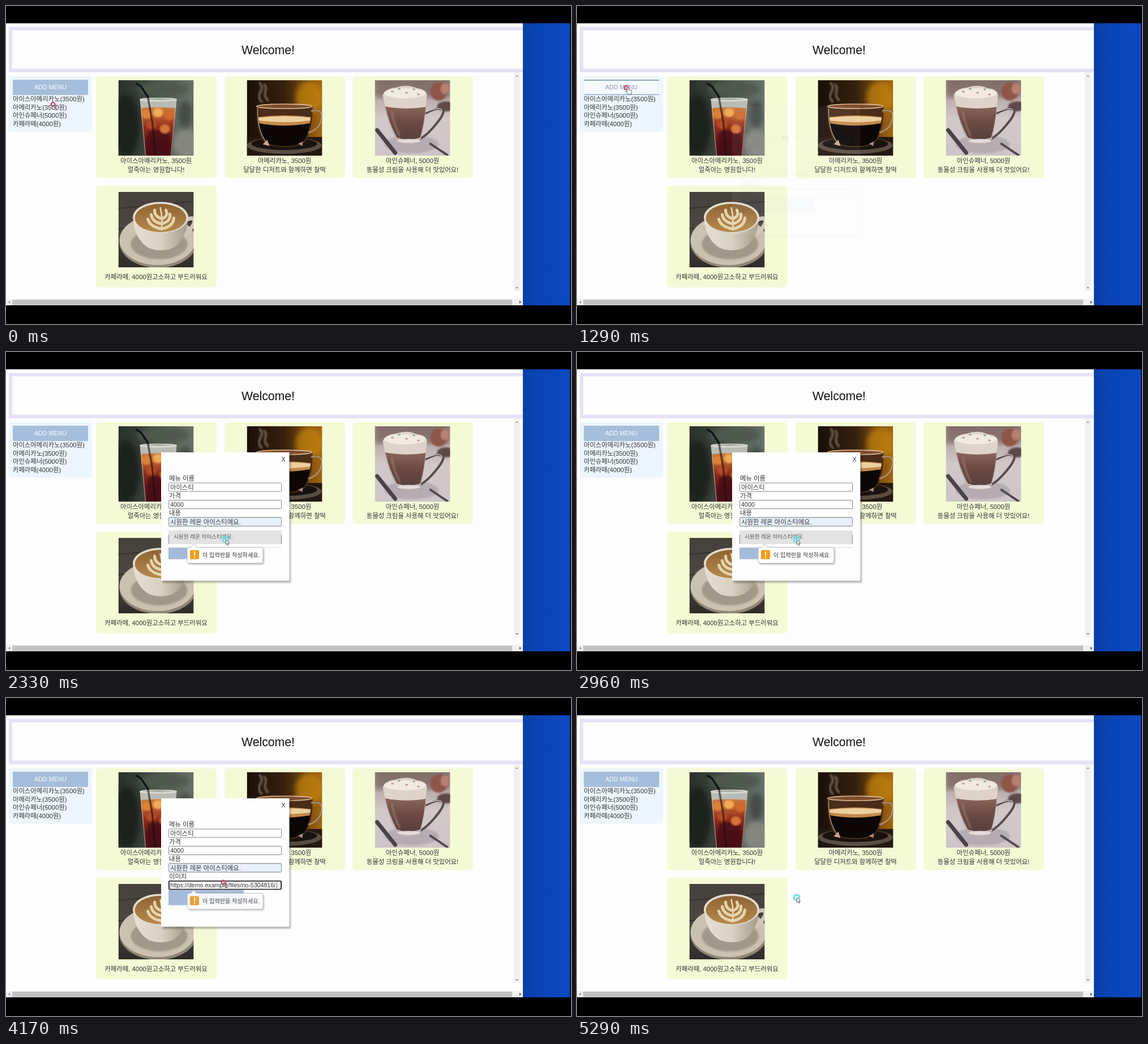
Recreate the animation shown at these times as an HTML page. Size 998x561 px, loop 5.33 s.

```html
<!DOCTYPE html>
<html lang="ko">
<head>
<meta charset="utf-8">
<title>Cafe menu</title>
<style>
  html, body { margin: 0; width: 100%; height: 100%; overflow: hidden; background: #000; }
  svg { display: block; width: 998px; height: 561px; }
  text { font-family: "Liberation Sans", "Noto Sans CJK KR", "Noto Sans CJK", sans-serif; fill: #333; white-space: pre; }
</style>
</head>
<body>
<svg id="stage" viewBox="0 0 998 561" xmlns="http://www.w3.org/2000/svg"></svg>
<script>
const LOOP = 5330;
const rect = (x, y, w, h, fill, more = '') =>
  `<rect x="${x}" y="${y}" width="${w}" height="${h}" fill="${fill}" ${more}/>`;
const oval = (x, y, rx, ry, fill, more = '') =>
  `<ellipse cx="${x}" cy="${y}" rx="${rx}" ry="${ry}" fill="${fill}" ${more}/>`;
const path = (d, fill, more = '') => `<path d="${d}" fill="${fill}" ${more}/>`;
const line = (d, color, width, more = '') =>
  path(d, 'none', `stroke="${color}" stroke-width="${width}" stroke-linecap="round" ${more}`);
const text = (x, y, s, size = 11.35, more = '') =>
  `<text x="${x}" y="${y}" font-size="${size}" ${more}>${s}</text>`;
const mid = (x, y, s, size, more = '') => text(x, y, s, size, 'text-anchor="middle" ' + more);
const group = (id, body) => `<g id="${id}" opacity="0">${body}</g>`;
const grad = (id, dir, ...stops) => `<linearGradient id="${id}" ${dir}>` +
  stops.map((c, i) => `<stop offset="${i / (stops.length - 1)}" stop-color="${c}"/>`).join('') +
  '</linearGradient>';
const down = 'x1="0" y1="0" x2="0" y2="1"', across = 'x1="0" y1="0" x2="1" y2="0"';
const blur = 'filter="url(#blur)"', soft = 'filter="url(#soft)"';

const defs = '<defs>' +
  grad('sky', across, '#0b3fa6', '#0a45b6', '#0a47bb', '#0a49c0') +
  grad('garden', across, '#2b302b', '#39413a', '#59625a', '#6a716a') +
  grad('tea', down, '#d0925e', '#c4692f', '#8f2d1c', '#5a1717', '#4a1215') +
  grad('amber', across, '#1a0f08', '#37200d', '#a5680f') +
  grad('table', down, '#a3918e', '#d2c8c9', '#cdc5c8') +
  grad('mocha', down, '#8a685c', '#6b4a42', '#58403b') +
  grad('wood', down, '#45413b', '#4c4740', '#2f2c28') +
  grad('cup', across, '#e6dfd2', '#d9d1c2', '#a49a8a') +
  grad('crema', down, '#8f6434', '#b58a4e') +
  '<clipPath id="square"><rect width="133" height="133"/></clipPath>' +
  '<filter id="blur"><feGaussianBlur stdDeviation="5"/></filter>' +
  '<filter id="soft"><feGaussianBlur stdDeviation="1.5"/></filter>' +
  '<filter id="lens" x="0" y="0" width="1" height="1"><feGaussianBlur stdDeviation=".7"/></filter></defs>';

const photos = [
  // iced coffee
  rect(0, 0, 133, 133, 'url(#garden)') +
  oval(14, 80, 24, 55, '#1d221e', blur) + oval(80, 16, 45, 14, '#4d5a4c', blur) +
  oval(120, 112, 24, 26, '#85877f', blur) + oval(118, 60, 12, 24, '#454c45', blur) +
  path('M38 33H103L94 133H47Z', 'url(#tea)') +
  path('M38 33H103L101 49Q70 46 40 49Z', '#b9bcb4') +
  path('M52 92Q72 82 91 94L90 133H51Z', '#4a1113', `opacity=".8" ${soft}`) +
  [[50, 60, '#dd8136'], [70, 57, '#f0ab58'], [90, 62, '#cf6a2c'], [58, 78, '#b44c25'], [82, 86, '#d5743a']]
    .map(([x, y, c]) => oval(x, y, 9, 8, c, soft)).join('') +
  line('M39 35L48 133M102 35L93 133', '#cfc9c0', 1.5, 'opacity=".6"') +
  oval(70.5, 34, 32, 2.5, 'none', 'stroke="#e4e6e1" stroke-width="1.5"') +
  line('M32 6L40 11L52 29', '#101418', 3.5) +
  line('M52 29L60 74L65 133', '#1a0f0f', 3.5, 'opacity=".6"'),
  // espresso
  rect(0, 0, 133, 133, 'url(#amber)') +
  oval(110, 30, 24, 28, '#c8860f', `opacity=".7" ${blur}`) +
  rect(0, 100, 133, 33, '#241812') +
  oval(66, 115, 66, 15, '#5a4d41') + oval(66, 112, 58, 11, '#1a120f') +
  path('M17 46H116Q117 84 104 106Q96 118 66 118Q36 118 28 106Q16 87 17 46Z', '#4a2c18') +
  path('M21 72H112Q109 98 99 109Q90 116 66 116Q42 116 34 109Q24 96 21 72Z', '#0c0706') +
  path('M20 65Q66 59 113 65L111 76Q66 84 22 76Z', '#c48a4c') +
  path('M21 66Q66 61 112 66L112 71Q66 77 21 71Z', '#ecd0a0') +
  oval(66, 46, 49, 4, '#7e4d2c', 'stroke="#d9b99a" stroke-width="1.6"') +
  line('M115 54Q135 50 132 67Q129 86 110 92', '#8c6640', 4.5) +
  line('M115 54Q135 50 132 67Q129 86 110 92', '#d3ae7e', 1.2) +
  line('M19 50Q18 88 34 109', '#b89a7c', 1.3) +
  line('M26 38C12 23 34 20 23 5M37 35C25 23 39 17 31 8', '#b5a396', 4, `opacity=".5" ${soft}`) +
  path('M28 113L36 105L40 116Z', '#c9a892') + path('M90 112L99 108L98 116Z', '#a88b7a'),
  // einspanner
  rect(0, 0, 133, 133, 'url(#table)') +
  rect(0, -8, 133, 38, '#75605b', `opacity=".7" ${blur}`) +
  oval(113, 20, 15, 16, '#8e5448', soft) + oval(124, 15, 8, 10, '#b8806f', soft) +
  oval(126, 46, 16, 9, '#5d4a46', soft) +
  oval(65, 113, 48, 16, '#b5abb0', soft) +
  line('M4 88L36 128', '#4a4249', 7) + line('M98 112L128 132', '#534b50', 4) +
  line('M90 58C126 40 130 52 106 80Q92 97 79 104', '#584a4b', 4) +
  line('M90 56C124 41 126 54 103 78', '#cdc1c3', 1.3) +
  path('M14 26H92Q89 75 81 105Q78 113 59 113Q40 113 37 105Q19 68 14 26Z', '#bfafad') +
  path('M18 44H90Q87 78 80 101Q59 108 39 101Q25 76 18 44Z', 'url(#mocha)') +
  line('M30 56Q34 80 44 98', '#a58a81', 3, `opacity=".6" ${soft}`) +
  oval(60, 107, 20, 3.5, '#e4dcdc') +
  path('M14 26Q20 14 37 13Q57 6 74 14Q92 16 92 27L90 47Q54 53 18 46Z', '#dfd3c9') +
  oval(53, 23, 37, 9, '#f1e9e2') +
  [[31, 20], [43, 15], [56, 22], [69, 16], [77, 25]]
    .map(([x, y], i) => oval(x, y, 2.4, 1.6, i % 2 ? '#8fa892' : '#bd9294')).join(''),
  // latte
  rect(0, 0, 133, 133, 'url(#wood)') +
  line('M0 29L133 17M0 65L133 53', '#302d29', 1.5) +
  oval(70, 89, 68, 45, '#8f8677') + oval(69, 85, 67, 44, '#cac1b1') + oval(72, 92, 50, 27, '#a2988a', soft) +
  line('M119 50C140 38 140 60 115 75', '#cfc6b7', 7) +
  path('M26 45Q28 84 54 99Q75 107 96 99Q121 84 123 45Z', 'url(#cup)') +
  oval(74.5, 45, 49, 27.5, '#e3dccd') + oval(74.5, 46, 45.5, 25, 'url(#crema)') +
  line('M76 67Q79 48 74 28', '#ecdcba', 2.5) +
  [0, 1, 2].map(i => line(`M76 ${65 - i * 9}Q${56 + i * 4} ${62 - i * 9} ${52 + i * 6} ${48 - i * 8}` +
    `M77 ${65 - i * 9}Q${97 - i * 4} ${61 - i * 9} ${98 - i * 7} ${46 - i * 7}`, '#e6d3ab', 5)).join('')
];

const cards = [
  [159, 124, ['아이스아메리카노, 3500원', '얼죽아는 영원합니다!']],
  [386, 124, ['아메리카노, 3500원', '달달한 디저트와 함께하면 찰떡']],
  [612, 124, ['아인슈페너, 5000원', '동물성 크림을 사용해 더 맛있어요!']],
  [159, 317, ['카페라떼, 4000원고소하고 부드러워요']]
].map(([x, y, rows], i) => {
  const top = y === 124 ? 131 : 328;
  return rect(x, y, 213, 179.5, '#f4fad5', 'rx="6"') +
    `<g transform="translate(${x + 39.5} ${top})" clip-path="url(#square)"><g filter="url(#lens)">${photos[i]}</g></g>` +
    rows.map((s, n) => mid(x + 106, (rows.length > 1 ? 277 : 482) + n * 16, s, 11.4)).join('');
}).join('');

const sidebar = rect(5, 124, 147, 97.5, '#edf5fe', 'rx="4"') +
  rect(12, 130, 133, 27, '#a5bedb', 'rx="1"') +
  mid(78.5, 147, 'ADD MENU', 10.7, 'style="fill:#f8fbff"') +
  group('hover', rect(12, 130, 133, 27, '#f5f9ff') + rect(12, 130, 133, 1.6, '#7590b2') +
    rect(12, 155.6, 133, 1.4, '#8ea5cf') + mid(78.5, 147, 'ADD MENU', 10.7, 'style="fill:#9196b0"')) +
  ['아이스아메리카노(3500원)', '아메리카노(3500원)', '아인슈페너(5000원)', '카페라떼(4000원)']
    .map((s, i) => text(12, 168 + i * 14.6, s)).join('');

const bars = rect(897, 117, 11, 386, '#f1f1f1') + rect(0, 517, 913, 11, '#f0f0f2') +
  rect(11, 518, 883, 9.5, '#c1c1c3') +
  path('M900 125h5l-2.5-3z', '#9a9a9a') + path('M900 496h5l-2.5 3z', '#8a8a8a') +
  path('M7 520v5l-3-2.5z', '#8a8a8a') + path('M907 520v5l3-2.5z', '#444');

const page = rect(0, 30.5, 913, 497.5, '#fdfdfd') +
  path('M5 37H913V117H5ZM11 43V110.5H913V43Z', '#e6e2f6', 'fill-rule="evenodd"') +
  mid(463, 84.5, 'Welcome!', 21.2, 'style="fill:#111"') +
  sidebar + cards + bars + rect(913, 30.5, 83.5, 497.5, 'url(#sky)');

const fieldY = [231, 261.5, 292, 322.5];
const fields = fieldY.map((y, i) =>
  text(288, y - 4, ['메뉴 이름', '가격', '내용', '이미지'][i]) +
  rect(287.5, y, 199, 15, '#fff', 'stroke="#858585" rx="1.5"')).join('');
const hints = ['ex) 아메리카노', 'ex) 4000', 'ex) 고소한 원두를 사용했어요.', 'URL']
  .map((s, i) => text(290, fieldY[i] + 11.5, s, 11.3, 'style="fill:#999"')).join('');

const ring = (color, r, w, more = '') => `<circle r="${r}" fill="none" stroke="${color}" stroke-width="${w}" ${more}/>`;
const red = ring('#d94766', 3.4, 2.4);
const beam = red + line('M3 1.5H7M5 1.5V9.5M3 9.5H7', '#666', 1);
const hand = red + path('M2 0Q3.5-1.5 4.5 0V4L9 5Q10 6 9 9L8 12H3L-1 7Q0 5 2 7Z', '#fff', 'stroke="#555" stroke-width=".9"');
const arrow = ring('#8ce9f3', 5.5, 4, `opacity=".5" ${soft}`) + ring('#6adcec', 4.8, 2.6) +
  path('M.5 0V9L2.6 7L4.2 10.3L5.4 9.7L4 6.4H6.8Z', '#fff', 'stroke="#555" stroke-width=".9"');

const modal = rect(276, 179, 227, 228, '#000', `opacity=".28" ${soft}`) +
  rect(274, 177, 226.5, 226.5, '#fefefe') + text(486.5, 193, 'X', 10.8) + fields +
  rect(287, 338.5, 133, 27, '#a5bbd9') + mid(353.5, 356, '메뉴 추가', 11, 'style="fill:#f8fbff"') +
  group('submit', rect(287, 338.5, 133, 27, '#f5f9ff') + rect(287, 338.5, 133, 1.6, '#7590b2') +
    rect(287, 364, 133, 1.4, '#8ea5cf') + mid(353.5, 356, '메뉴 추가', 11, 'style="fill:#9196b0"')) +
  group('hints', hints) +
  group('filled', text(290, 242.5, '아이스티') + text(290, 272.5, '4000', 10.8)) +
  group('autofill', rect(287.5, 292, 199, 15, '#e8f0fe', 'stroke="#8a8f9b" rx="1.5"')) +
  group('note', text(290, 304, '', 11.4, 'id="typed"')) +
  group('list', rect(287, 308, 200, 37, '#fefefe') + rect(287, 314.5, 200, 24.5, '#e3e3e3') +
    line('M287.5 323V338M486.5 323V338', '#858585', 1) + line('M288 345H486', '#ddd', 1) +
    text(296, 329, '시원한 레몬 아이스티에요.', 9.6, 'style="fill:#555"')) +
  group('url', rect(288, 323, 198, 14.5, '#fff', 'stroke="#151515" stroke-width="1.7" rx="1.5"') +
    text(290, 334, 'https://demo.example/files/no-5304816/', 10.64) +
    line('M478.5 326V335', '#333', .8)) +
  group('bubble', rect(322, 346, 134, 29, '#000', `rx="4" opacity=".25" ${soft}`) +
    path('M323 344.5H326L331.5 339L337 344.5H451Q454 344.5 454 348V369Q454 372.5 451 372.5H323Q320 372.5 320 369V348Q320 344.5 323 344.5Z',
      '#fff', 'stroke="#b5b5b5"') +
    rect(325, 349.5, 16, 16, '#f29d16', 'rx="2"') + rect(332, 352, 2, 7, '#fff') + rect(332, 361, 2, 2, '#fff') +
    text(347, 361.5, '이 입력란을 작성하세요.', 10.1));

const $ = id => document.getElementById(id);
$('stage').innerHTML = defs + rect(0, 0, 998, 561, '#000') + page + group('modal', modal) +
  group('beamA', beam) + group('hand', hand) + group('beamB', beam) +
  group('arrowA', arrow) + group('beamC', beam) + group('arrowB', arrow);

// opacity over time: [ms, value]
const fades = {
  hover: [[330, 0], [500, 1], [1600, 1], [1830, .35], [2060, 0]],
  modal: [[1250, 0], [1290, .05], [1420, .5], [1640, 1], [4760, 1], [5080, 0]],
  hints: [[1250, 1], [1640, 1], [1830, .5], [2060, 0]],
  filled: [[1620, 0], [1830, .85], [1960, 1]],
  note: [[1680, 0], [1830, .8], [1960, 1]],
  autofill: [[1960, 0], [2250, 1]],
  list: [[1660, 0], [1830, .5], [2060, 1], [3250, 1], [3480, 0]],
  bubble: [[1660, 0], [1830, .45], [2100, 1], [4000, 1], [4170, .85], [4420, 0]],
  url: [[3340, 0], [3600, 1]],
  submit: [[4400, 0], [4560, 1]],
  beamA: [[330, 1], [440, 0]],
  hand: [[330, 0], [440, 1], [1600, 1], [1830, .45], [2060, 0]],
  beamB: [[1250, 0], [1290, .1], [1640, 1], [1830, .75], [2080, 0]],
  arrowA: [[1880, 0], [2120, 1], [3250, 1], [3420, 0]],
  beamC: [[3280, 0], [3460, 1], [4280, 1], [4460, 0]],
  arrowB: [[4300, 0], [4480, 1]]
};
// cursor stops: [ms, x, y]
const moves = {
  beamA: [[40, 83, 173.5], [500, 87, 144]],
  hand: [[40, 83, 173.5], [500, 87, 144]],
  beamB: [[0, 367, 232.5]],
  arrowA: [[0, 388, 331]],
  beamC: [[0, 384, 325]],
  arrowB: [[4300, 386, 335], [4600, 388, 352]]
};

function at(keys, t, col = 1) {
  if (t <= keys[0][0]) return keys[0][col];
  for (let i = 1; i < keys.length; i++) {
    const a = keys[i - 1], b = keys[i];
    if (t < b[0]) return a[col] + (b[col] - a[col]) * (t - a[0]) / (b[0] - a[0]);
  }
  return keys[keys.length - 1][col];
}

const note = '시원한 레몬 아이스티에요.';
function draw(t) {
  for (const id in fades) $(id).setAttribute('opacity', at(fades[id], t).toFixed(3));
  for (const id in moves)
    $(id).setAttribute('transform', `translate(${at(moves[id], t).toFixed(2)} ${at(moves[id], t, 2).toFixed(2)})`);
  $('typed').textContent = note.slice(0, Math.round(at([[1860, 2], [2200, note.length]], t)));
}

const start = performance.now();
function tick() {
  draw((performance.now() - start) % LOOP);
  requestAnimationFrame(tick);
}
draw(0);
requestAnimationFrame(tick);
</script>
</body>
</html>
```
